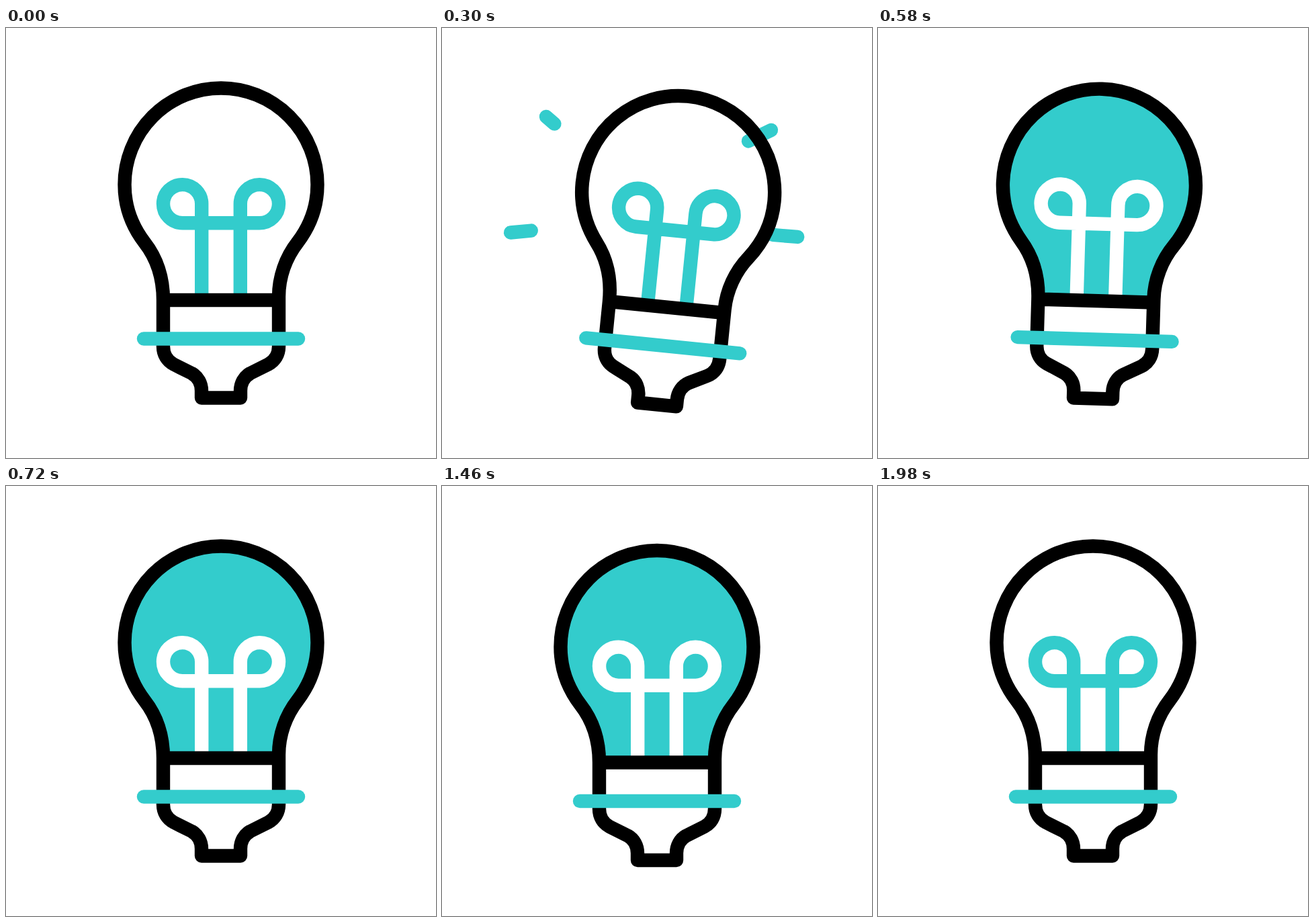
An HTML page that plays this animation: 640 px wide and 640 px high, repeating every 2400 ms.

```html
<!DOCTYPE html>
<html lang="en">
<head>
<meta charset="utf-8">
<title>Light bulb</title>
<style>
  html, body { margin: 0; width: 100%; height: 100%; overflow: hidden; background: #fff; }
  svg { display: block; width: 100%; height: 100%; }
  path { fill: none; stroke-width: 20.4; stroke-linejoin: round; }
  .teal { stroke: #3cc; }
  .black { stroke: #000; }
  .round { stroke-linecap: round; }
</style>
</head>
<body>
<svg viewBox="0 0 640 640">
  <g id="rays"></g>
  <g id="bulb">
    <path id="glass" d="M234 405C234 371 224 342 206 319C187 294 176.5 265 176.5 233A143.5 143.5 0 0 1 463.5 233C463.5 265 453 294 434 319C416 342 406 371 406 405Z"/>
    <path id="wire" d="M291.2 405V262A28.6 28.6 0 1 0 262.6 290.3H377.4A28.6 28.6 0 1 0 348.8 262V405"/>
    <path class="black" d="M234 405C234 371 224 342 206 319C187 294 176.5 265 176.5 233A143.5 143.5 0 0 1 463.5 233C463.5 265 453 294 434 319C416 342 406 371 406 400V474C406 486 400 495.500 390.500 500.500L363.500 514C354.500 519 349 529 349 540V550.500H291V540C291 529 285.500 519 276.500 514L249.500 500.500C240 495.500 234 486 234 474V400M234 405H406"/>
    <path class="teal round" d="M205 462.500H435"/>
  </g>
</svg>
<script>
const LOOP = 2400, MOVE = 700, PEAK = 300, ON = 20, OFF = 1280;
const $ = id => document.getElementById(id);
const clamp = u => Math.min(1, Math.max(0, u));
const smooth = u => u * u * (3 - 2 * u);

// inner x, y, outer x, y, start time
const rays = [
  [204, 174, 155, 132, 99],
  [170, 298, 102, 304.5, 129],
  [432, 180, 490, 152, 149],
  [469, 306, 530, 311, 153]
].map(pos => {
  const el = document.createElementNS('http://www.w3.org/2000/svg', 'path');
  el.setAttribute('class', 'teal round');
  $('rays').append(el);
  return { el, pos };
});

// Press down, then ease back up
function drop(t) {
  if (t <= 0 || t >= MOVE) return 0;
  return 10 * (t < PEAK ? smooth(t / PEAK) : ((MOVE - t) / (MOVE - PEAK)) ** 2.2);
}

function tilt(t) {
  const keys = [[0, 0], [120, -6.1], [PEAK, 6.1], [MOVE, 0]];
  for (let i = 1; i < keys.length; i++) {
    const [t0, a] = keys[i - 1], [t1, b] = keys[i];
    if (t < t1) return a + (b - a) * smooth(clamp((t - t0) / (t1 - t0)));
  }
  return 0;
}

function drawRay({ el, pos: [x0, y0, x1, y1, start] }, t) {
  const head = clamp((t - start) / 150), tail = clamp((t - start - 90) / 150);
  const at = u => `${x0 + (x1 - x0) * u} ${y0 + (y1 - y0) * u}`;
  el.setAttribute('d', head > tail ? `M${at(tail)}L${at(head)}` : '');
}

function draw(t) {
  const y = drop(t - ON) + drop(t - OFF);
  const lit = t >= ON + PEAK && t < OFF + PEAK;
  $('bulb').setAttribute('transform', `translate(0 ${y}) rotate(${tilt(t - ON)} 320 550.5)`);
  $('glass').style.fill = lit ? '#3cc' : 'none';
  $('wire').style.stroke = lit ? '#fff' : '#3cc';
  rays.forEach(ray => drawRay(ray, t));
}

const begin = performance.now();
function tick() {
  draw((performance.now() - begin) % LOOP);
  requestAnimationFrame(tick);
}
tick();
</script>
</body>
</html>
```
